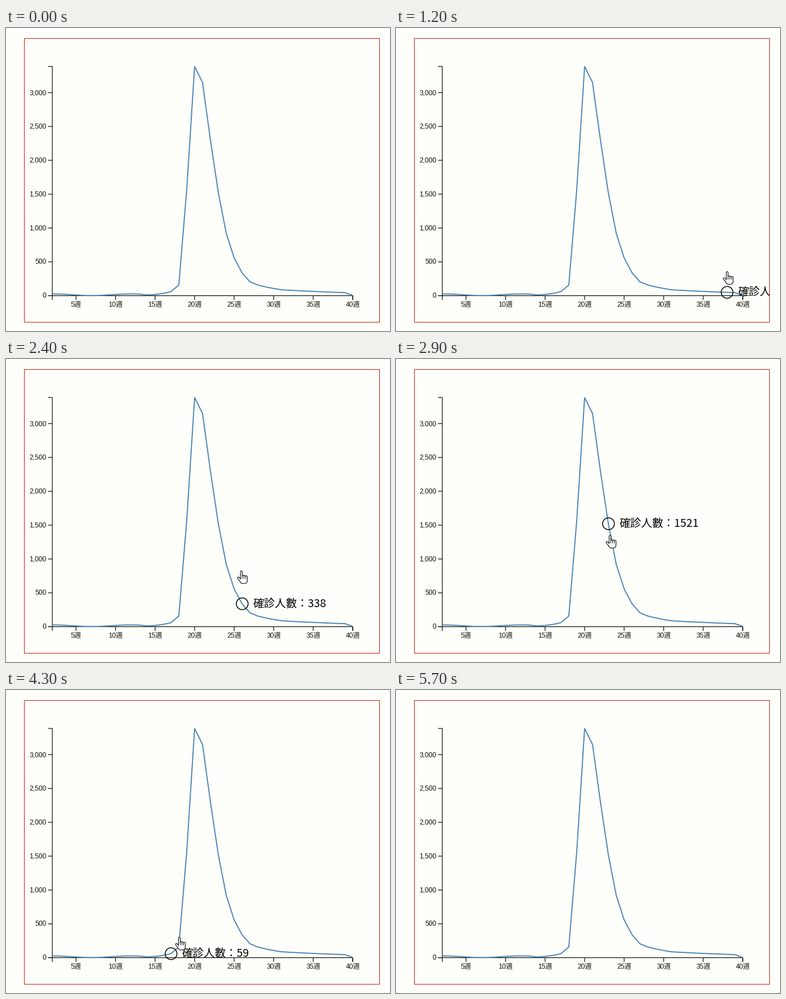
A matplotlib script for the animation above (7 s loop, 680 by 536 pixels).

```python
import numpy as np
import matplotlib.pyplot as plt
from matplotlib.animation import FuncAnimation
from matplotlib.collections import LineCollection
from matplotlib.patches import Circle, Rectangle

plt.rcParams["path.snap"] = False

W, H, DPI = 680, 536, 64
FRAMES, INTERVAL = 70, 100
PAPER, INK, BORDER, CURVE = "#fefefa", "#101004", "#c41c0c", "#4682b4"
LEFT, RIGHT, TOP, BASE = 82, 614, 68, 473.5
FIRST_WEEK, LAST_WEEK, WEEK_STEP = 2, 40, 14
CJK = "Noto Sans CJK JP"

# Turning points of the outbreak: week, cases
SURGE = [(14, 10), (17, 59), (18, 157), (19, 1560), (20, 3386), (21, 3150),
         (22, 2300), (23, 1521), (27, 205), (28, 157), (31, 87), (39, 45), (40, 3)]

# Turning points of the pointer: time in ms, x, y
PATH = [(500, 512, 78), (1200, 586.5, 430.5), (2000, 447, 424.5),
        (2900, 379, 311.5), (3300, 340, 180), (3600, 325, 325),
        (4300, 307, 437), (5100, 122, 457), (5600, 66, 456)]
SHOW, HIDE = 500, 5700
LEAD = 40  # the marker runs this many ms ahead of the drawn pointer


def pt(px):
    return px * 72 / DPI


def week_x(week):
    return LEFT + WEEK_STEP * (week - FIRST_WEEK)


def case_y(cases):
    return BASE - cases * .11973


def weekly_cases(weeks):
    """A slow ripple before the outbreak, geometric growth and decay after."""
    ripple = 14 + 12 * np.cos(2 * np.pi * (weeks - 2) / 10)
    knots, levels = zip(*SURGE)
    surge = np.exp(np.interp(weeks, knots, np.log(levels)))
    return np.rint(np.where(weeks < knots[0], ripple, surge)).astype(int)


def pointer(t):
    times, xs, ys = zip(*PATH)
    return np.interp(t, times, xs), np.interp(t, times, ys)


fig = plt.figure(figsize=(W / DPI, H / DPI), dpi=DPI, facecolor=PAPER)
ax = fig.add_axes([0, 0, 1, 1])
ax.set(xlim=(0, W), ylim=(H, 0))
ax.axis("off")


def stroke(xs, ys, color=INK, width=1.25, **kw):
    ax.plot(xs, ys, color=color, lw=pt(width), solid_joinstyle="miter",
            solid_capstyle="butt", **kw)


def label(x, y, text, size=12, color=INK, family=("Liberation Sans", CJK), **kw):
    return ax.text(x, y, text, fontsize=pt(size), color=color,
                   family=list(family), va="baseline", **kw)


def draw_axes():
    tick = 7.5
    stroke([LEFT - tick, LEFT, LEFT, LEFT - tick], [TOP, TOP, BASE, BASE])
    stroke([LEFT, LEFT, RIGHT, RIGHT], [BASE + tick, BASE, BASE, BASE + tick])
    for cases in range(0, 3001, 500):
        y = case_y(cases)
        stroke([LEFT - tick, LEFT], [y, y])
        label(71.5, y + 3.8, f"{cases:,}", ha="right")
    for week in range(5, LAST_WEEK + 1, 5):
        x = week_x(week)
        stroke([x, x], [BASE, BASE + tick])
        label(x + .3, 493, f"{week}週", ha="center")


def hand_limbs():
    """Segments and widths of four fingers, the thumb and the palm."""
    fingers = [[(3 * i, 9 + .6 * i if i else 1.9), (3 * i, 16)] for i in range(4)]
    thumb, palm = [(-5.2, 13), (-1, 18)], [(2, 18.3), (6, 18.3)]
    return np.array(fingers + [thumb, palm]), np.array([2, 2, 2, 2, 2.2, 8])


def hand_layer(color, widths, zorder):
    return ax.add_collection(LineCollection(
        [], colors=color, linewidths=pt(widths), capstyle="round",
        zorder=zorder), autolim=False)


draw_axes()
weeks = np.arange(FIRST_WEEK, LAST_WEEK + 1)
case_counts = weekly_cases(weeks)
stroke(week_x(weeks), case_y(case_counts), CURVE, 1.875, zorder=3)

ring = ax.add_patch(Circle((0, 0), 10.4, fill=False, ec="black", lw=pt(1.5), zorder=4))
tip_text = label(0, 0, "", 19.5, "black", (CJK,), weight="light", zorder=4)

# Hides the part of the tooltip that runs past the frame
ax.add_patch(Rectangle((661, 0), W - 661, H, fc=PAPER, lw=0, zorder=5))
ax.add_patch(Rectangle((32.5, 18.5), 629, 502, fill=False, ec=BORDER, lw=pt(1),
                       joinstyle="miter", zorder=6))

limbs, limb_widths = hand_limbs()
hand = [hand_layer("black", limb_widths + 2.2, 7), hand_layer("white", limb_widths, 8)]
moving = [ring, tip_text, *hand]


def update(frame):
    t = frame * INTERVAL
    visible = SHOW <= t < HIDE
    for artist in moving:
        artist.set_visible(visible)
    if not visible:
        return moving

    ahead_x = pointer(t + LEAD)[0]
    nearest = round((ahead_x - LEFT) / WEEK_STEP)
    index = min(max(nearest, 0), len(weeks) - 1)
    x, y = week_x(weeks[index]), case_y(case_counts[index])
    ring.center = x + .3, y
    tip_text.set_position((x + 19.5, y + 5.6))
    tip_text.set_text(f"確診人數：{case_counts[index]}")
    for layer in hand:
        layer.set_segments(limbs + pointer(t))
    return moving


anim = FuncAnimation(fig, update, frames=FRAMES, interval=INTERVAL,
                     init_func=lambda: update(0), repeat=True, repeat_delay=0)
plt.show()
```
